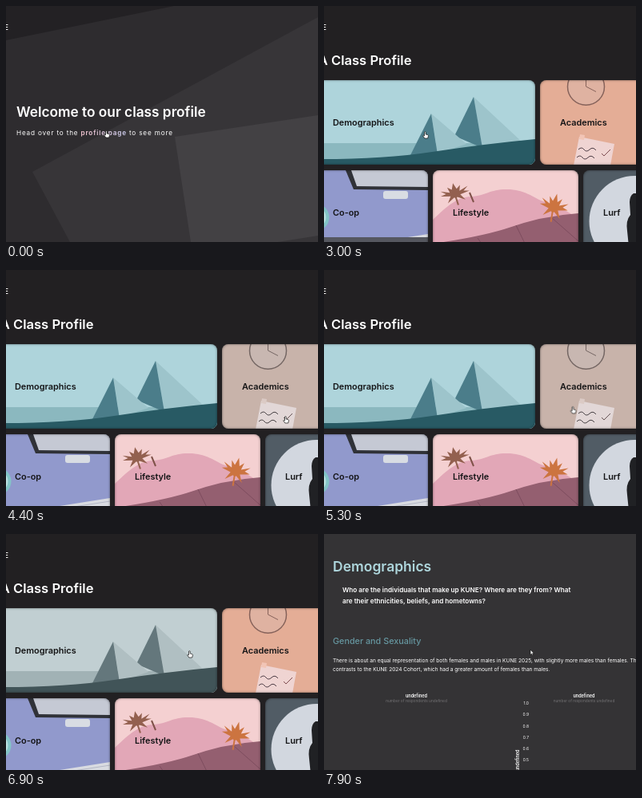
Animation of 390x296 px, one loop 8000 ms. Source, as an HTML page:

```html
<!DOCTYPE html>
<html lang="en">
<head>
<meta charset="utf-8">
<title>Class profile</title>
<style>
  html, body { margin: 0; width: 100%; height: 100%; overflow: hidden; background: #222022; }
  #stage { position: absolute; left: 0; top: 0; width: 390px; height: 296px; overflow: hidden; }
  #stage * { animation-duration: 8s; animation-iteration-count: infinite; animation-timing-function: linear; }
  svg { position: absolute; left: 0; top: 0; display: block; }
  text { font-family: Inter, "Open Sans", sans-serif; fill: #fff; white-space: pre; }
  .semi { font-weight: 600; }
  .mid { text-anchor: middle; }
  .end { text-anchor: end; }

  .page, .shape { position: absolute; inset: 0; }
  #home { background: #2e2c2f; animation-name: home; }
  #menu { background: #222022; animation-name: menu; }
  #detail { background: #343335; animation-name: detail; }
  #stage .page { animation-timing-function: step-end; }
  @keyframes home { 0% { visibility: visible } 32.5%, 100% { visibility: hidden } }
  @keyframes menu { 0% { visibility: hidden } 32.5% { visibility: visible } 95%, 100% { visibility: hidden } }
  @keyframes detail { 0% { visibility: hidden } 95%, 100% { visibility: visible } }

  /* drifting backdrop */
  #corner { background: #232124; animation-name: corner; }
  #sheet { background: #373538; animation-name: sheet; }
  #panel { background: #434144; animation-name: panel; }
  @keyframes corner {
    0% { clip-path: polygon(0 0, 210px 0, 0 43px) }
    22.5%, 100% { clip-path: polygon(0 0, 215px 0, 0 45px) }
  }
  @keyframes sheet {
    0% { clip-path: polygon(33px 208px, 390px 14px, 390px 296px, 80px 296px) }
    22.5%, 100% { clip-path: polygon(27px 215px, 390px 17px, 390px 296px, 70px 296px) }
  }
  @keyframes panel {
    0% { clip-path: polygon(211px 164px, 390px 137px, 390px 288px, 340px 296px, 231px 296px) }
    22.5%, 100% { clip-path: polygon(205px 168px, 390px 139px, 390px 295px, 384px 296px, 224px 296px) }
  }

  #scroll { position: absolute; inset: 0; animation-name: scroll; }
  @keyframes scroll {
    0%, 86.5% { transform: translateY(0) }
    87.5% { transform: translateY(-6px) }
    90%, 100% { transform: translateY(-52px) }
  }

  .card { position: absolute; height: 106px; border-radius: 8px; overflow: hidden; }
  .card::after { content: ""; position: absolute; inset: 0; border-radius: 8px; box-shadow: inset 0 0 3px rgba(0, 0, 0, .5); }
  .card text { font-size: 10.9px; font-weight: 600; fill: #141416; }
  #demo { left: -20px; top: 93px; width: 284px; animation-name: demo; }
  #acad { left: 270px; top: 93px; width: 150px; animation-name: acad; }
  #coop { left: -20px; top: 206px; width: 150px; }
  #life { left: 136px; top: 206px; width: 182px; animation-name: life; }
  #lurf { left: 324px; top: 206px; width: 110px; animation-name: lurf; }
  @keyframes demo {
    0%, 38%, 47.5%, 70% { filter: saturate(1) }
    41%, 45%, 72.5%, 100% { filter: saturate(.38) }
  }
  @keyframes acad {
    0%, 51.5%, 58%, 63%, 70%, 100% { filter: saturate(1) }
    53.5%, 56%, 65%, 68% { filter: saturate(.38) }
  }
  @keyframes life {
    0%, 46%, 50%, 59.5%, 65%, 100% { filter: saturate(1) }
    48%, 61.5%, 63% { filter: saturate(.38) }
  }
  @keyframes lurf {
    0%, 49%, 53%, 56%, 60%, 100% { filter: saturate(1) }
    51%, 58% { filter: saturate(.38) }
  }

  #desk { animation-name: desk; }
  @keyframes desk { 0%, 39% { opacity: 1 } 42%, 100% { opacity: 0 } }

  #cursor { overflow: visible; animation-name: roam; }
  #cursor path { fill: #fff; stroke: #111; stroke-width: .7; }
  #stage #hand, #stage #arrow { animation-timing-function: step-end; }
  #hand { animation-name: hand; }
  #arrow { animation-name: detail; }
  @keyframes hand { 0% { visibility: visible } 95%, 100% { visibility: hidden } }
  @keyframes roam {
    0%, 1% { transform: translate(126px, 161px) }
    3.75% { transform: translate(112px, 152px) }
    7.5% { transform: translate(166px, 138px) }
    11.25% { transform: translate(138px, 161px) }
    16% { transform: translate(124px, 162px) }
    19% { transform: translate(143px, 162px) }
    22.5% { transform: translate(128px, 162px) }
    32.5%, 43.75% { transform: translate(127px, 162px) }
    47.5% { transform: translate(200px, 235px) }
    50.6% { transform: translate(345px, 235px) }
    53.75%, 55.5% { transform: translate(350px, 188px) }
    58% { transform: translate(350px, 240px) }
    61% { transform: translate(250px, 245px) }
    65% { transform: translate(320px, 180px) }
    68% { transform: translate(300px, 170px) }
    71% { transform: translate(220px, 165px) }
    75%, 91% { transform: translate(230px, 151px) }
    94%, 100% { transform: translate(258px, 148px) }
  }
</style>
</head>
<body>
<div id="stage">

  <div class="page" id="home">
    <div class="shape" id="corner"></div>
    <div class="shape" id="sheet"></div>
    <div class="shape" id="panel"></div>
    <svg width="390" height="296">
      <linearGradient id="link" gradientUnits="userSpaceOnUse" x1="93" x2="151" y1="0" y2="0">
        <stop stop-color="#f3c3cf"/><stop offset="1" stop-color="#cfd0f2"/>
      </linearGradient>
      <text class="end semi" x="3" y="29.5" font-size="9">E</text>
      <text class="semi" x="13" y="139" font-size="17.25">Welcome to our class profile</text>
      <text x="13" y="162" font-size="8.2" letter-spacing=".82">Head over to the <tspan class="semi" fill="url(#link)">profile page</tspan> to see more</text>
    </svg>
  </div>

  <div class="page" id="menu">
    <div id="scroll">
      <svg width="390" height="360">
        <text class="end semi" x="3" y="29.5" font-size="9">E</text>
        <text class="end semi" x="109.5" y="74" font-size="16.6">A Class Profile</text>
        <text class="semi" x="326" y="335.5" font-size="8">Read the Data Set</text>
      </svg>

      <div class="card" id="demo">
        <svg width="284" height="106" viewBox="-20 93 284 106">
          <path fill="#aed4db" d="M-20 93H264V199H-20z"/>
          <path fill="#8bb8bf" d="M-20 172H264V199H-20z"/>
          <path fill="#9dc4cb" d="M187 114L198 178L247 170z"/>
          <path fill="#4b7d8a" d="M187 114L163 163L198 178z"/>
          <path fill="#9dc4cb" d="M134 135L142 185L178 173z"/>
          <path fill="#4b7d8a" d="M134 135L108 187H142z"/>
          <path fill="#285a64" d="M-20 192Q70 193 135 183T264 167V199H-20z"/>
          <text x="11" y="150">Demographics</text>
        </svg>
      </div>

      <div class="card" id="acad">
        <svg width="150" height="106" viewBox="270 93 150 106">
          <path fill="#e4ad96" d="M270 93H420V199H270z"/>
          <g fill="none" stroke="#86625a" stroke-width="1.5">
            <circle cx="327.5" cy="101.3" r="23" fill="#dfb2a1"/>
            <path stroke-width="1" d="M327.5 84V101L340 107.5"/>
          </g>
          <path fill="#efd4d2" d="M319 164L363 173L358 200H312z"/>
          <path fill="#f2c5b6" d="M320 161l6 1l-1 6l-6-1z"/>
          <path fill="none" stroke="#4d3d45" d="M318 180q4-4 7 0t7 0t8 1M316 190q4-4 7 0t7 0t8 1"/>
          <path fill="none" stroke="#7d4c50" d="M347 185l3 3l8-8"/>
          <text x="295" y="150">Academics</text>
        </svg>
      </div>

      <div class="card" id="coop">
        <svg width="150" height="106" viewBox="-20 206 150 106">
          <path fill="#9199cc" d="M-20 206H130V312H-20z"/>
          <path fill="#303238" d="M27 206L37 230L130 231V206z"/>
          <path fill="#c5c9d4" d="M34 206L41 226L130 227V206z"/>
          <rect x="74" y="232" width="31" height="10" rx="3" fill="#d8dce3"/>
          <circle cx="-11" cy="265" r="15.5" fill="#b8e0df" stroke="#83c4c7" stroke-width="4"/>
          <path fill="#d9dbe1" d="M42 300L130 286V312H46z"/>
          <path fill="none" stroke="#b3b6c4" d="M46 303L130 290"/>
          <path id="desk" fill="#55575f" d="M-20 290H130V312H-20z"/>
          <text x="11" y="263">Co-op</text>
        </svg>
      </div>

      <div class="card" id="life">
        <svg width="182" height="106" viewBox="136 206 182 106">
          <defs>
            <path id="maple" d="M0-18L3-8L8-13L6-4L17-9L11-3L18-1L6 2L11 12L2 5L1 6L2 18H0L-1 6L-2 5L-11 12L-6 2L-18-1L-11-3L-17-9L-6-4L-8-13L-3-8z"/>
          </defs>
          <path fill="#f4d0d1" d="M136 206H318V312H136z"/>
          <path fill="#e2a7b7" d="M136 268C155 250 166 240 184 239C202 238 207 230 228 230C252 230 260 240 274 245C292 251 306 257 318 268V312H136z"/>
          <path fill="#945f70" d="M136 298Q192 290 225 280Q272 263 318 260V312H136z"/>
          <path fill="none" stroke="#7d4c5e" d="M192 291L207 312M240 275L258 312M284 265L318 295"/>
          <path fill="none" stroke="#7e5148" stroke-width="2" d="M182 234L187 246"/>
          <use href="#maple" fill="#93604f" transform="translate(164 236) rotate(-12) scale(1.02 .78)"/>
          <use href="#maple" fill="#cc7440" transform="translate(287 253) rotate(14)"/>
          <text x="161" y="263">Lifestyle</text>
        </svg>
      </div>

      <div class="card" id="lurf">
        <svg width="110" height="106" viewBox="324 206 110 106">
          <path fill="#515c65" d="M324 206H434V312H324z"/>
          <circle cx="388.5" cy="270" r="57" fill="#d2d7df"/>
          <path fill="#202124" d="M387 235Q382 238 382 246L383 262Q377 269 379 282L382 312H410V235z"/>
          <text x="349" y="263">Lurf</text>
        </svg>
      </div>
    </div>
  </div>

  <div class="page" id="detail">
    <svg width="390" height="296">
      <text class="semi" x="11" y="47" font-size="17.5" style="fill:#aed6dc">Demographics</text>
      <g class="semi" font-size="8.18">
        <text x="23" y="73">Who are the individuals that make up KUNE? Where are they from? What</text>
        <text x="23" y="86.5">are their ethnicities, beliefs, and hometowns?</text>
      </g>
      <text x="11" y="138" font-size="10.8" font-weight="500" style="fill:#6697a0">Gender and Sexuality</text>
      <g font-size="6.55">
        <text x="11" y="161">There is about an equal representation of both females and males in KUNE 2025, with slightly more males than females. This</text>
        <text x="11" y="172">contrasts to the KUNE 2024 Cohort, which had a greater amount of females than males.</text>
      </g>
      <g class="mid" font-size="5.5">
        <text class="semi" x="115.5" y="205">undefined</text>
        <text class="semi" x="325" y="205">undefined</text>
        <text x="115.5" y="211.3" font-size="4.75" style="fill:#747375">number of respondents undefined</text>
        <text x="325" y="211.3" font-size="4.75" style="fill:#747375">number of respondents undefined</text>
        <text class="semi" transform="translate(243.5 284) rotate(-90)">undefined</text>
      </g>
      <g id="axis" class="end" font-size="5"></g>
    </svg>
  </div>

  <svg id="cursor" width="1" height="1">
    <path id="hand" d="M-1.5-4Q-.6-4.8 .2-4V-1L2.8-.4Q3.6 0 3.4 1L2.7 4H-1.2L-3.4 .8Q-3-.3-1.5 .9z"/>
    <path id="arrow" d="M0-3V3.5L1.5 2.2L2.5 4.2L3.5 3.7L2.6 1.8H4.4z"/>
  </svg>
</div>

<script>
  // axis ticks, 1.0 downwards
  const axis = document.getElementById('axis');
  for (let i = 0; i < 6; i++) {
    const tick = document.createElementNS(axis.namespaceURI, 'text');
    tick.setAttribute('x', 256);
    tick.setAttribute('y', 214.3 + i * 14.1);
    tick.textContent = (1 - i / 10).toFixed(1);
    axis.append(tick);
  }
</script>
</body>
</html>
```
